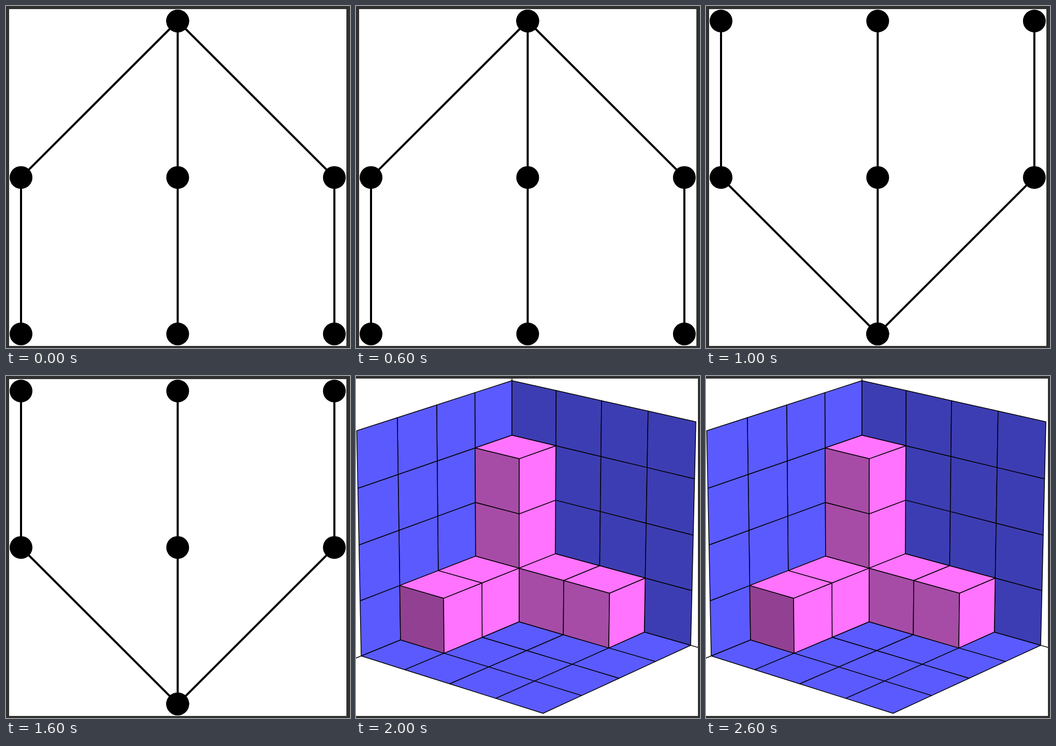
An HTML page with a canvas that plays this animation: 664x661 px, repeating every 3000 ms.

```html
<!DOCTYPE html>
<html lang="en">
<head>
<meta charset="utf-8">
<title>Tree and cubes</title>
<style>
  html, body { margin: 0; width: 100%; height: 100%; overflow: hidden; background: #323132; }
  canvas { display: block; }
</style>
</head>
<body>
<canvas id="stage" width="664" height="661"></canvas>
<script>
const ctx = document.getElementById('stage').getContext('2d');
const BLUE = '#5a5aff', NAVY = '#3d3db3', PINK = '#ff73ff', PLUM = '#a64ca6', DARK_PLUM = '#924192';

function paper(x, y, w, h) {
  ctx.fillStyle = '#323132';
  ctx.fillRect(0, 0, 664, 661);
  ctx.fillStyle = '#fff';
  ctx.fillRect(x, y, w, h);
}

// Three branches of two edges each, meeting in one root.
function drawTree(upsideDown) {
  paper(6, 6, 651, 651);
  ctx.fillStyle = ctx.strokeStyle = '#000';
  ctx.lineWidth = 4;
  const at = i => 29 + 302.4 * i;
  const row = i => at(upsideDown ? 2 - i : i);
  for (let i = 0; i < 3; i++) {
    const branch = [[at(1), row(0)], [at(i), row(1)], [at(i), row(2)]];
    ctx.beginPath();
    for (const p of branch) ctx.lineTo(...p);
    ctx.stroke();
    for (const p of branch) {
      ctx.beginPath();
      ctx.arc(...p, 22, 0, 2 * Math.PI);
      ctx.fill();
    }
  }
}

// Perspective view into the corner of a 4 x 4 x 4 room.
function project([x, y, z]) {
  const w = 1 - 0.01218 * x - 0.01415 * y - 0.00675 * z;
  return [
    (301 + 78.385 * x - 72.89 * y - 2.032 * z) / w,
    (422.2 + 18.238 * x + 22.045 * y - 103.36 * z) / w
  ];
}

function shape(points, color) {
  ctx.beginPath();
  for (const p of points) ctx.lineTo(...project(p));
  ctx.closePath();
  if (color) {
    ctx.fillStyle = color;
    ctx.fill();
  }
  ctx.stroke();
}

// Unit square at p, perpendicular to the given axis.
function face(p, axis, color) {
  const step = (da, db) => {
    const q = [...p];
    q[(axis + 1) % 3] += da;
    q[(axis + 2) % 3] += db;
    return q;
  };
  shape([step(0, 0), step(1, 0), step(1, 1), step(0, 1)], color);
}

function cube(x, y, z) {
  face([x, y + 1, z], 1, y > 1 ? DARK_PLUM : PLUM);
  face([x + 1, y, z], 0, PINK);
  face([x, y, z + 1], 2, PINK);
}

function drawRoom() {
  paper(0, 5, 660, 652);
  ctx.save();
  ctx.beginPath();
  ctx.rect(0, 5, 660, 652);
  ctx.clip();
  ctx.strokeStyle = '#000';
  ctx.lineWidth = 1.5;
  ctx.lineJoin = 'round';
  for (const end of [[5, 0, 0], [0, 5, 0], [0, 0, 5]]) shape([[0, 0, 0], end]);
  for (let i = 0; i < 4; i++) {
    for (let j = 0; j < 4; j++) {
      face([0, i, j], 0, BLUE);
      face([i, 0, j], 1, NAVY);
      face([i, j, 0], 2, BLUE);
    }
  }
  for (let z = 0; z < 3; z++) cube(0, 0, z);
  for (let i = 1; i < 3; i++) {
    cube(i, 0, 0);
    cube(0, i, 0);
  }
  ctx.restore();
}

const scenes = [() => drawTree(false), () => drawTree(true), drawRoom];
const start = performance.now();

function tick() {
  const t = (performance.now() - start) % 3000;
  scenes[Math.floor(t / 1000)]();
  requestAnimationFrame(tick);
}
tick();
</script>
</body>
</html>
```
